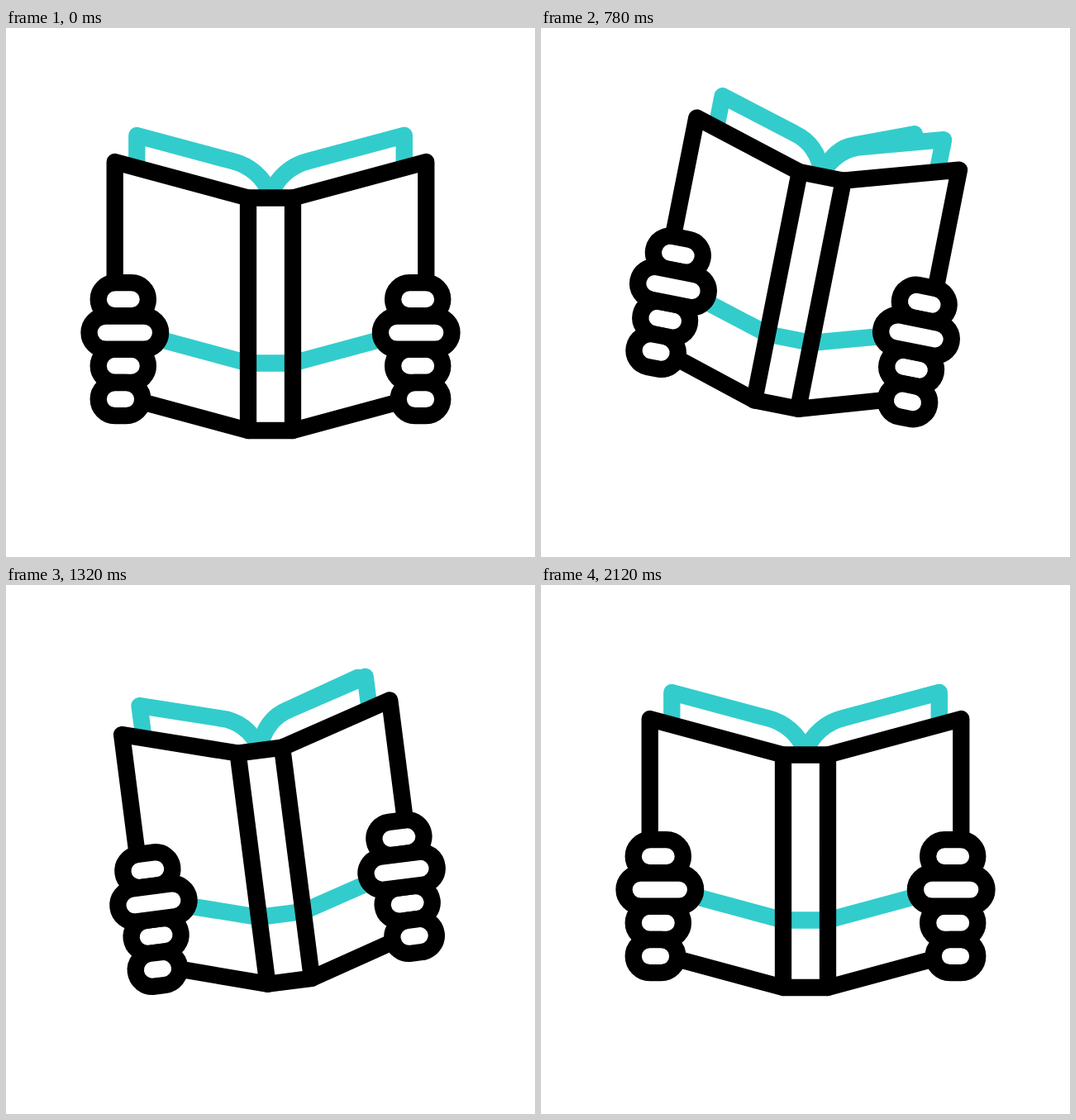
Write an HTML page that moves like this. It is 640x640 px and loops after 2.4 s.

```html
<!DOCTYPE html>
<html lang="en">
<head>
<meta charset="utf-8">
<title>Reading</title>
<style>
  html, body { margin: 0; width: 100%; height: 100%; overflow: hidden; background: #fff; }
  svg { display: block; width: 100vw; height: 100vh; }
  path, rect { stroke-width: 20.3; stroke-linecap: round; stroke-linejoin: round; fill: #fff; stroke: #000; }
  .teal { stroke: #33cccc; }
  .line { fill: none; }
  .plain { stroke: none; }
</style>
</head>
<body>
<svg viewBox="0 0 640 640">
  <g id="book">
    <path id="flip" class="teal line"/>
    <path id="page" class="teal"/>
    <use href="#page" transform="translate(640) scale(-1 1)"/>
    <path class="plain" d="M293 205.5H347V487H293Z"/>
    <path class="teal line" d="M293 405.5H347"/>
    <g id="half">
      <path id="cover" class="plain"/>
      <path id="band" class="teal line"/>
      <g id="hand">
        <rect x="111.7" y="308.2" width="60.2" height="40.2" rx="20.1"/>
        <rect x="111.7" y="388.7" width="60.2" height="40.2" rx="20.1"/>
        <rect x="111.7" y="429" width="53.6" height="40.2" rx="20.1"/>
        <rect x="100.5" y="348.5" width="86.6" height="40.2" rx="20.1"/>
      </g>
      <path id="outline" class="line"/>
    </g>
    <use href="#half" transform="translate(640) scale(-1 1)"/>
    <path class="line" d="M293 205.5H347M293 487H347"/>
  </g>
</svg>
<script>
  const LOOP = 2400;
  const PIVOT = '320 305';

  // [time, value] keys, eased in and out between neighbours
  const lift = [[0, 0], [292, 61], [783, -28], [1035, 58], [1400, -15], [1760, 15], [1980, 0]];
  const tilt = [[0, 0], [425, -16.5], [835, 12.6], [1380, -8], [1840, 4], [2120, 0]];
  const fold = [[0, 0], [210, 0], [840, 1], [1200, 1], [1910, 0]];
  const turns = [[690, 1090], [1277, 1677]];

  const el = {};
  for (const node of document.querySelectorAll('[id]')) el[node.id] = node;

  const ease = p => p * p * (3 - 2 * p);

  function at(keys, t) {
    const i = keys.findIndex(k => k[0] > t);
    if (i < 0) return keys[keys.length - 1][1];
    const [t0, a] = keys[i - 1], [t1, b] = keys[i];
    return a + (b - a) * ease((t - t0) / (t1 - t0));
  }

  // side: 1 lies on the left, -1 on the right
  function pagePath(side, c) {
    const x = offset => 320 - offset * side;
    const tip = x(161.7 - 26 * c), top = 130 + 3.5 * c, knee = 46 - 4 * c;
    return `M${tip} 180V${top}L${x(knee)} 161C${x(knee - 20)} 166 ${x(8)} 180 320 202`;
  }

  function draw(t) {
    const c = at(fold, t);
    const dx = 27 * c, dy = 3.5 * c, edge = 131.7 + dx;
    const turn = turns.find(([a, b]) => t >= a && t < b);
    const side = turn ? 2 * ease((t - turn[0]) / (turn[1] - turn[0])) - 1 : -1;
    const set = (id, d) => el[id].setAttribute('d', d);

    set('flip', pagePath(side, c));
    set('page', pagePath(1, c));
    set('cover', `M${edge} ${162 + dy}L293 205.5V487L${edge} ${443.5 + dy}Z`);
    set('band', `M${edge} ${362 + dy}L293 405.5`);
    set('outline', `M${edge} ${308 + dy}V${162 + dy}L293 205.5V487L${165.3 + dx} ${452.5 + dy}`);
    el.hand.setAttribute('transform', `translate(${dx} ${dy})`);
    el.book.setAttribute('transform', `translate(0 ${at(lift, t)}) rotate(${at(tilt, t)} ${PIVOT})`);
  }

  const start = performance.now();
  function tick() {
    draw((performance.now() - start) % LOOP);
    requestAnimationFrame(tick);
  }
  tick();
</script>
</body>
</html>
```
